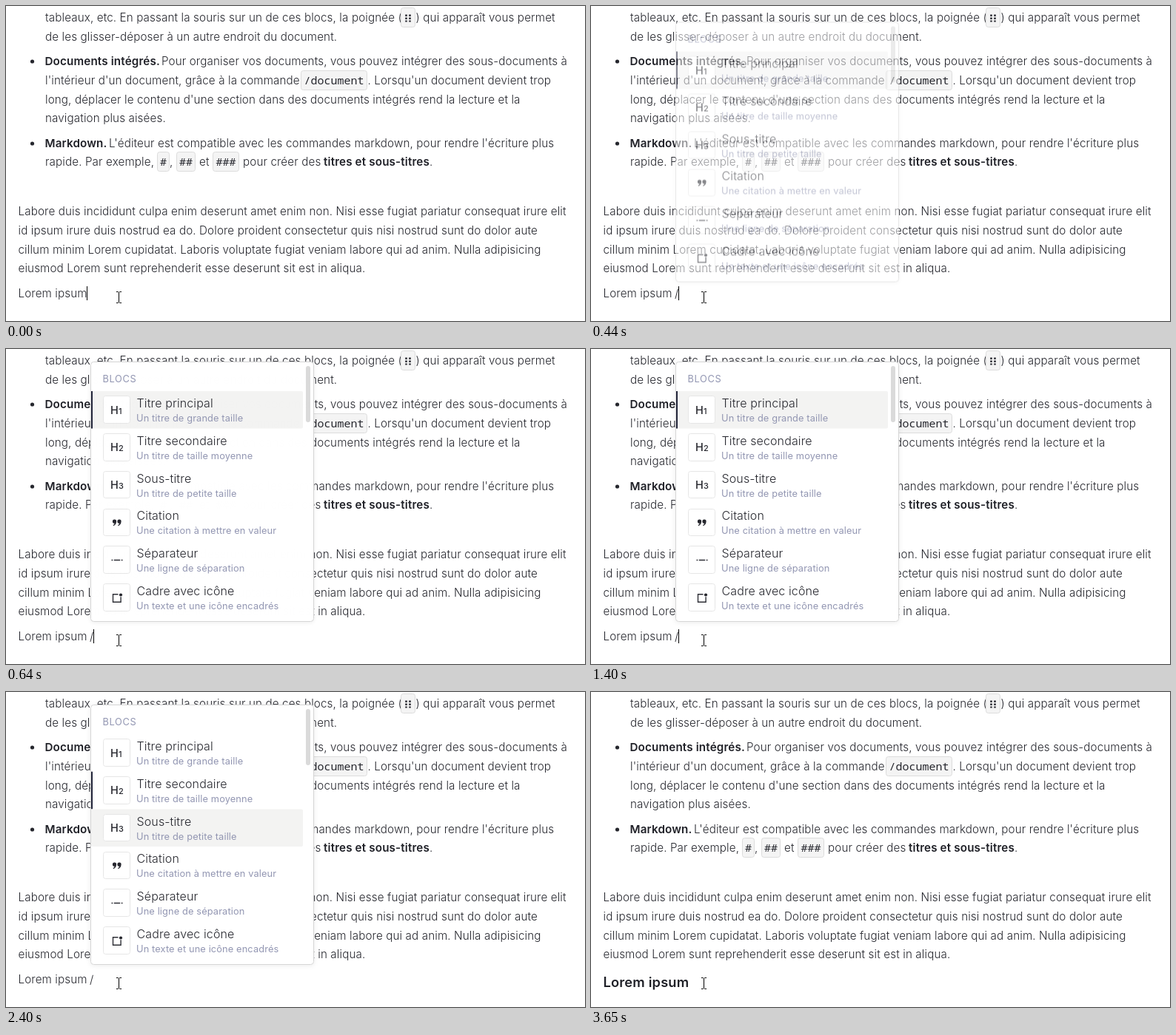
An HTML page for the animation above (4.09 s loop, 782x426 px).

```html
<!DOCTYPE html>
<html lang="fr">
<head>
<meta charset="utf-8">
<title>Menu de blocs</title>
<style>
html, body { margin: 0; width: 100%; height: 100%; overflow: hidden; background: #fff; }
svg { display: block; width: 782px; height: 426px; font: 300 15.2px Inter, sans-serif; letter-spacing: .008em; fill: #26272e; }
text { white-space: pre; }
.bold { font-weight: 600; letter-spacing: .01em; fill: #1f2027; }
.code { font: 500 15px "Noto Sans Mono", monospace; letter-spacing: 0; }
.chip rect { fill: #f4f4f4; stroke: #dcdcdc; }
.heading { font-size: 18.24px; }

.panel { fill: #fff; stroke: #d6d6d6; filter: drop-shadow(0 1px 3px rgba(0, 0, 0, .08)); }
.label, .sub { font-size: 12.8px; font-weight: 400; fill: #9296b2; }
.label { letter-spacing: .05em; }
.name { font-size: 16px; }
.box { fill: #fff; stroke: #e6e6e6; }
.h { font-size: 14.5px; font-weight: 500; }
.n { font-size: 11px; }
.line { fill: none; stroke: #2e2f36; stroke-width: 1.4; }
.row { fill: #f3f3f2; }
.bar { fill: #23263b; }

/* One loop is 4090 ms */
.menu, .draft, .slash, .caret, .title, .title-caret, .row, .bar { animation: 4090ms step-end infinite; }
.menu { animation-name: menu; }
.draft { animation-name: draft; }
.slash { animation-name: slash; }
.caret { animation-name: caret; }
.title { animation-name: title; }
.title-caret { animation-name: title-caret; }
.row1 { animation-name: row1; }
.row2 { animation-name: row2; }
.row3 { animation-name: row3; }
.bar1 { animation-name: bar1; }
.bar2 { animation-name: bar2; }
.bar3 { animation-name: bar3; }

@keyframes menu {
  0% { opacity: 0; transform: translateY(10px); }
  8.43% { opacity: 0; transform: translateY(10px); animation-timing-function: ease; }
  15.77% { opacity: 1; transform: none; }
  77.26%, 100% { opacity: 0; transform: none; }
}
@keyframes draft { 0% { opacity: 1; } 77.26%, 100% { opacity: 0; } }
@keyframes slash { 0% { opacity: 0; } 8.8% { opacity: 1; } 77.26%, 100% { opacity: 0; } }
@keyframes title { 0% { opacity: 0; } 77.26%, 100% { opacity: 1; } }
@keyframes title-caret { 0% { opacity: 0; } 77.26% { opacity: 1; } 89.24%, 100% { opacity: 0; } }
@keyframes caret {
  0% { opacity: 1; transform: none; }
  .97% { opacity: 1; transform: translateX(4px); }
  8.8% { opacity: 1; transform: translateX(9px); }
  21.76% { opacity: 0; transform: translateX(9px); }
  34.22% { opacity: 1; transform: translateX(9px); }
  47.18% { opacity: 0; transform: translateX(9px); }
  59.65% { opacity: 1; transform: translateX(9px); }
  72.37%, 100% { opacity: 0; transform: translateX(9px); }
}
@keyframes row1 { 0% { opacity: 1; } 46.2%, 100% { opacity: 0; } }
@keyframes row2 { 0% { opacity: 0; } 46.2% { opacity: 1; } 58.67%, 100% { opacity: 0; } }
@keyframes row3 { 0% { opacity: 0; } 58.67%, 100% { opacity: 1; } }
@keyframes bar1 {
  0% { opacity: 1; }
  46.2% { opacity: 1; animation-timing-function: ease; }
  52%, 100% { opacity: 0; }
}
@keyframes bar2 {
  0% { opacity: 0; }
  46.2% { opacity: 0; animation-timing-function: ease; }
  52% { opacity: 1; }
  58.67% { opacity: 1; animation-timing-function: ease; }
  64.5%, 100% { opacity: 0; }
}
@keyframes bar3 {
  0% { opacity: 0; }
  58.67% { opacity: 0; animation-timing-function: ease; }
  64.5%, 100% { opacity: 1; }
}
</style>
</head>
<body>
<svg viewBox="0 0 782 426">
  <text x="53" y="21">tableaux, etc. En passant la souris sur un de ces blocs, la poignée (</text>
  <text x="553.5" y="21">) qui apparaît vous permet</text>
  <text x="53" y="47">de les glisser-déposer à un autre endroit du document.</text>

  <circle cx="35.5" cy="75" r="2.6"/>
  <text class="bold" x="52.5" y="80">Documents intégrés.</text>
  <text x="210" y="80">Pour organiser vos documents, vous pouvez intégrer des sous-documents à</text>
  <text x="53" y="106">l'intérieur d'un document, grâce à la commande</text>
  <text x="488.5" y="106">. Lorsqu'un document devient trop</text>
  <text x="53" y="132">long, déplacer le contenu d'une section dans des documents intégrés rend la lecture et la</text>
  <text x="53" y="157">navigation plus aisées.</text>

  <circle cx="35.5" cy="186" r="2.6"/>
  <text class="bold" x="52.5" y="191">Markdown.</text>
  <text x="139" y="191">L'éditeur est compatible avec les commandes markdown, pour rendre l'écriture plus</text>
  <text x="53" y="216">rapide. Par exemple,</text>
  <text x="221" y="216">,</text>
  <text x="261" y="216">et</text>
  <text x="320" y="216">pour créer des</text>
  <text x="429" y="216"><tspan class="bold">titres et sous-titres</tspan>.</text>

  <g class="chip">
    <rect x="533.5" y="2.5" width="19" height="26" rx="3"/>
    <rect x="398.5" y="87.5" width="89" height="26" rx="3"/>
    <rect x="204.5" y="197.5" width="16" height="26" rx="3"/>
    <rect x="230.5" y="197.5" width="25" height="26" rx="3"/>
    <rect x="279.5" y="197.5" width="35" height="26" rx="3"/>
  </g>
  <path d="M540.5 11.5v10M545.5 11.5v10" fill="none" stroke="#2e2f36" stroke-width="2.6" stroke-dasharray="2.4 1.6"/>
  <g class="code">
    <text x="402.5" y="106">/document</text>
    <text x="208" y="216">#</text>
    <text x="234" y="216">##</text>
    <text x="283.5" y="216">###</text>
  </g>

  <text x="16.5" y="283">Labore duis incididunt culpa enim deserunt amet enim non. Nisi esse fugiat pariatur consequat irure elit</text>
  <text x="16.5" y="309">id ipsum irure duis nostrud ea do. Dolore proident consectetur quis nisi nostrud sunt do dolor aute</text>
  <text x="16.5" y="335">cillum minim Lorem cupidatat. Laboris voluptate fugiat veniam labore qui ad anim. Nulla adipisicing</text>
  <text x="16.5" y="360">eiusmod Lorem sunt reprehenderit esse deserunt sit est in aliqua.</text>

  <text class="draft" x="16.5" y="394">Lorem ipsum</text>
  <text class="slash" x="113" y="394">/</text>
  <rect class="caret" x="109" y="379" width="1" height="19" fill="#000"/>
  <text class="bold heading title" x="16.5" y="399">Lorem ipsum</text>
  <rect class="title-caret" x="136" y="381" width="1" height="22" fill="#000"/>

  <g class="menu">
    <rect class="panel" x="114.5" y="17.5" width="301" height="351" rx="4"/>
    <text class="label" x="130.5" y="45">BLOCS</text>
    <rect x="405" y="23" width="6" height="76" rx="3" fill="#dadada"/>

    <rect class="row row1" x="115" y="57" width="286" height="50.5" rx="2"/>
    <rect class="row row2" x="115" y="107.7" width="286" height="50.5" rx="2"/>
    <rect class="row row3" x="115" y="158.4" width="286" height="50.5" rx="2"/>
    <rect class="bar bar1" x="115" y="57" width="2" height="50.5"/>
    <rect class="bar bar2" x="115" y="107.7" width="2" height="50.5"/>
    <rect class="bar bar3" x="115" y="158.4" width="2" height="50.5"/>

    <g class="box">
      <rect x="131.5" y="63.5" width="36" height="37" rx="3"/>
      <rect x="131.5" y="114.5" width="36" height="37" rx="3"/>
      <rect x="131.5" y="165.5" width="36" height="36" rx="3"/>
      <rect x="131.5" y="216.5" width="36" height="36" rx="3"/>
      <rect x="131.5" y="266.5" width="36" height="37" rx="3"/>
      <rect x="131.5" y="317.5" width="36" height="37" rx="3"/>
    </g>

    <text class="h" x="141" y="88">H<tspan class="n">1</tspan></text>
    <text class="h" x="141" y="138">H<tspan class="n">2</tspan></text>
    <text class="h" x="141" y="189">H<tspan class="n">3</tspan></text>
    <path id="mark" d="M146.5 230.5a2.6 2.6 0 0 1 2.6 2.8c0 3-1.6 5-4 6l-.5-1.1c1.2-.6 1.8-1.4 2-2.4a2.6 2.6 0 0 1-.1-5.3z"/>
    <use href="#mark" x="6.5"/>
    <path class="line" d="M142.5 285.5h1.8M145.8 285.5h8.4M155.7 285.5h1.8"/>
    <path class="line" d="M151.5 331.7h-7v10.6h10.6v-7"/>
    <circle cx="155" cy="332.5" r="2.1"/>

    <g class="name">
      <text x="176.5" y="79">Titre principal</text>
      <text x="176.5" y="130">Titre secondaire</text>
      <text x="176.5" y="181">Sous-titre</text>
      <text x="176.5" y="231">Citation</text>
      <text x="176.5" y="282">Séparateur</text>
      <text x="176.5" y="333">Cadre avec icône</text>
    </g>
    <g class="sub">
      <text x="176" y="98">Un titre de grande taille</text>
      <text x="176" y="149">Un titre de taille moyenne</text>
      <text x="176" y="200">Un titre de petite taille</text>
      <text x="176" y="250">Une citation à mettre en valeur</text>
      <text x="176" y="301">Une ligne de séparation</text>
      <text x="176" y="352">Un texte et une icône encadrés</text>
    </g>
  </g>

  <path d="M149 386.5h2.5l1 1 1-1h2.5M152.5 387v14M149 401.5h2.5l1-1 1 1h2.5" fill="none" stroke="#000"/>
</svg>
</body>
</html>
```
